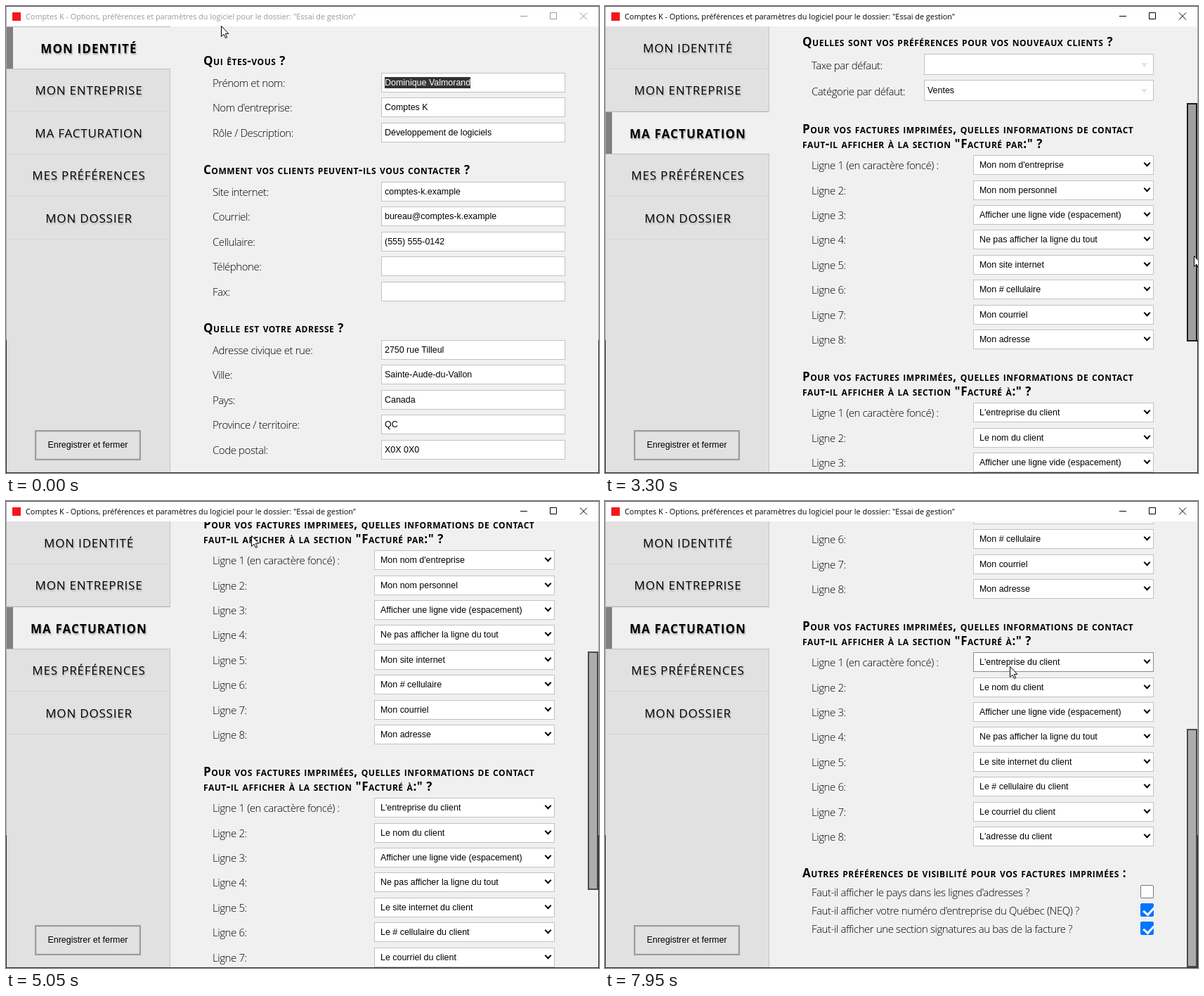
Animation of 844x664 px, one loop 8 s. Source, as an HTML page:

```html
<!DOCTYPE html>
<html lang="fr">
<head>
<meta charset="utf-8">
<style>
html, body { margin: 0; width: 100%; height: 100%; overflow: hidden; background: #f0f0f0; }
#stage { position: relative; width: 844px; height: 664px; overflow: hidden; background: #f0f0f0; color: #000; }
#stage * { position: absolute; box-sizing: border-box; white-space: pre; }
#bar { left: 0; top: 0; width: 844px; height: 29px; background: #fff; color: #000; }
#bar.idle { color: #999; }
#bar svg { left: 0; top: 0; fill: none; stroke: currentColor; }
.title { font: 10.85px/20px "Open Sans", sans-serif; }
.logo { background: #f5161f; }
#side { left: 0; top: 29px; width: 234px; height: 635px; background: #e1e1e1; border-right: 1px solid #c3c3c3; }
.nav { left: 0; width: 234px; height: 60px; border-bottom: 1px solid #d6d6d6; text-align: center;
  font: 17px/60px "Open Sans", sans-serif; letter-spacing: .8px; text-shadow: 1px 2px 2px #aaa; padding-left: 2px; }
.nav.on { background: #f0f0f0; font-weight: 700; letter-spacing: 1.1px; line-height: 62px;
  border-bottom-color: #bdbdbd; box-shadow: 0 -1px 0 #b5b5b5; }
.nav::before { content: ""; position: absolute; left: 0; top: 0; width: 10px; height: 59px; }
.nav.on::before { background: #808080; }
.nav.hover::before { background: #bababa; }
.button { border: 2px solid #9c9c9c; background: #e1e1e1; box-shadow: inset 0 0 0 1px #d0d0d0;
  text-align: center; font: 12.45px/38px Arial, "Liberation Sans", sans-serif; }
#view { left: 0; top: 0; width: 844px; height: 664px; clip-path: inset(30px 1px 1px 234px); }
.head { font: 700 17px/20px "Open Sans", sans-serif; font-variant-caps: small-caps; letter-spacing: .54px; }
.label { font: 300 15px/20px "Open Sans", sans-serif; letter-spacing: -.45px; word-spacing: .2px; }
.field { background: #fff; border: 1px solid #c2c2c2; padding-left: 4px; font: 12.45px/26px Arial, "Liberation Sans", sans-serif; }
.field.hover { border-color: #8a8a8a; }
.field span { position: static !important; background: #333; color: #fff; padding: 1px 0; }
.list { padding-left: 8px; }
.list::after { content: ""; position: absolute; right: 5.5px; top: 7px; width: 7px; height: 7px; box-sizing: border-box;
  border: solid #000; border-width: 0 2px 2px 0; transform: rotate(45deg); }
.combo { line-height: 28px; }
.combo::after { content: ""; position: absolute; right: 8px; top: 12px; width: 9px; height: 6px;
  background: #e4e4e4; clip-path: polygon(0 0, 100% 0, 50% 100%); }
.drop { background: #fff; border: 1px dashed #bcbcbc; }
.check { background: #fff; border: 1px solid #767676; border-radius: 2px; }
.check.on { background: #0075ff; border-color: #0075ff; }
.check.on::after { content: ""; position: absolute; left: 5.5px; top: 1px; width: 6.5px; height: 12px;
  border: solid #fff; border-width: 0 3px 3px 0; transform: rotate(42deg); }
#thumb { left: 828px; width: 15px; height: 339px; background: #adadad; border: 2px solid #4a4a4a; }
#thumb.hover { background: #a0a0a0; border-color: #1c1c1c; }
#frame { left: 0; top: 0; width: 844px; height: 664px; border: 1px solid #333;
  border-image: linear-gradient(#aaa 475px, #2a2a2a 475px) 1; }
#edge { left: 0; top: 0; width: 844px; height: 1px; background: #555; }
#cursor { left: 0; top: 0; overflow: visible; fill: #fff; stroke: #000; }
</style>
</head>
<body>
<div id="stage">
  <div id="view"></div>
  <div id="side"></div>
  <div id="bar"><svg width="844" height="29"><path d="M732 14.5h10M774.5 9.5h9v9h-9zM817 9.5l10 10M827 9.5l-10 10"/></svg></div>
  <div id="thumb"></div>
  <div id="frame"></div>
  <div id="edge"></div>
  <svg id="cursor" width="1" height="1">
    <path id="arrow" d="M.5 .5V15.5L4 12.2L6.5 17.5L8.7 16.5L6.3 11.3H10.8Z"/>
    <path id="hand" transform="translate(-6.5)" d="M5 12V2Q5 .5 6.5 .5T8 2V8Q8 6 9.5 6.3T11 8Q11 7 12.4 7.2T13.8 9Q14 8 15.2 8.3T16.3 10V15Q16 17 15 18.5V21.5H6.5V19Q4 16 1.2 13Q.2 11.5 1.5 10.7Q3 10.5 5 12.8Z"/>
  </svg>
</div>
<script>
const $ = id => document.getElementById(id);
const STEP = 35.4, NAV = 60.4, LOOP = 8000;
const selects = [];

function add(parent, cls, x, y, text = "", w, h) {
  const el = document.createElement("div");
  el.className = cls;
  el.textContent = text;
  el.style.left = x + "px";
  el.style.top = Math.round(y - (h || 20) / 2) + "px";
  if (w) { el.style.width = w + "px"; el.style.height = h + "px"; }
  parent.append(el);
  return el;
}
function page() {
  const el = document.createElement("div");
  el.style.cssText = "left:0;top:0";
  $("view").append(el);
  return el;
}
const head = (p, y, s) => add(p, "head", 281, y, s);
const label = (p, y, s) => add(p, "label", 294, y, s);
const check = (p, y, on) => add(p, on ? "check on" : "check", 762, y, "", 19, 19);
function select(p, cls, x, y, text, h) {
  selects.push({ el: add(p, "field " + cls, x, y, text, 781 - x, h), x, y, h });
}

// Title bar, navigation and button
add($("bar"), "logo", 9, 14.5, "", 12, 12);
add($("bar"), "title", 28, 15, 'Comptes K - Options, préférences et paramètres du logiciel pour le dossier: "Essai de gestion"');
const navs = ["MON IDENTITÉ", "MON ENTREPRISE", "MA FACTURATION", "MES PRÉFÉRENCES", "MON DOSSIER"]
  .map((s, i) => add($("side"), "nav", 0, 31 + NAV * i, s, 234, 60));
add($("side"), "button", 41, 595.5, "Enregistrer et fermer", 151, 43);

// Identity page
const identity = page();
function form(y, title, rows) {
  head(identity, y, title);
  rows.forEach(([name, value], i) => {
    const cy = y + 31 + STEP * i;
    label(identity, cy, name);
    add(identity, "field", 534, cy, value, 262, 28);
  });
}
form(78, "Qui êtes-vous ?", [
  ["Prénom et nom:", ""],
  ["Nom d'entreprise:", "Comptes K"],
  ["Rôle / Description:", "Développement de logiciels"]]);
form(233, "Comment vos clients peuvent-ils vous contacter ?", [
  ["Site internet:", "comptes-k.example"],
  ["Courriel:", "bureau@comptes-k.example"],
  ["Cellulaire:", "(555) 555-0142"],
  ["Téléphone:", ""],
  ["Fax:", ""]]);
form(458, "Quelle est votre adresse ?", [
  ["Adresse civique et rue:", "2750 rue Tilleul"],
  ["Ville:", "Sainte-Aude-du-Vallon"],
  ["Pays:", "Canada"],
  ["Province / territoire:", "QC"],
  ["Code postal:", "X0X 0X0"]]);
const marked = document.createElement("span");
marked.textContent = "Dominique Valmorand";
identity.querySelector(".field").append(marked);

// Billing page
const billing = page();
head(billing, 78, "Sélectionnez votre logo d'entreprise (Hauteur max. 80 pixels) :");
add(billing, "drop", 293, 141.5, "", 488, 95);
add(billing, "logo", 503, 143.5, "", 71, 71);
label(billing, 205, "Afficher ce logo sur mes factures clients:");
check(billing, 205, true);
head(billing, 253, "Quelles sont vos préférences pour vos nouveaux clients ?");
label(billing, 286, "Taxe par défaut:");
select(billing, "combo", 454, 285, "", 30);
label(billing, 323, "Catégorie par défaut:");
select(billing, "combo", 454, 322, "Ventes", 30);

function lines(y, side, values) {
  head(billing, y, "Pour vos factures imprimées, quelles informations de contact");
  head(billing, y + 20.5, `faut-il afficher à la section "Facturé ${side}:" ?`);
  values.forEach((value, i) => {
    const cy = y + 51.2 + STEP * i;
    label(billing, cy, `Ligne ${i + 1}${i ? ":" : " (en caractère foncé) :"}`);
    select(billing, "list", 524, cy, value, 28);
  });
}
const blank = "Afficher une ligne vide (espacement)", none = "Ne pas afficher la ligne du tout";
lines(377, "par", ["Mon nom d'entreprise", "Mon nom personnel", blank, none,
  "Mon site internet", "Mon # cellulaire", "Mon courriel", "Mon adresse"]);
lines(729, "à", ["L'entreprise du client", "Le nom du client", blank, none,
  "Le site internet du client", "Le # cellulaire du client", "Le courriel du client", "L'adresse du client"]);
head(billing, 1080, "Autres préférences de visibilité pour vos factures imprimées :");
["Faut-il afficher le pays dans les lignes d'adresses ?",
 "Faut-il afficher votre numéro d'entreprise du Québec (NEQ) ?",
 "Faut-il afficher une section signatures au bas de la facture ?"].forEach((s, i) => {
  label(billing, 1106.5 + 26 * i, s);
  check(billing, 1106 + 26 * i, i > 0);
});

// Keys are [time, value, ...]; the curve never overshoots a key
function curve(keys, t, k = 1) {
  const last = keys.length - 1;
  const slope = i => i < 0 || i >= last ? 0 : (keys[i + 1][k] - keys[i][k]) / (keys[i + 1][0] - keys[i][0]);
  const tangent = i => {
    const a = slope(i - 1), b = slope(i);
    return a * b > 0 ? 2 * a * b / (a + b) : 0;
  };
  if (t >= keys[last][0]) return keys[last][k];
  let i = 0;
  while (t >= keys[i + 1][0]) i++;
  const d = keys[i + 1][0] - keys[i][0], u = (t - keys[i][0]) / d, v = 1 - u;
  return keys[i][k] * v * v * (1 + 2 * u) + keys[i + 1][k] * u * u * (3 - 2 * u)
    + d * u * v * (tangent(i) * v - tangent(i + 1) * u);
}
const scrollKeys = [[0, 0], [2750, 0], [3300, 202], [3650, 293], [4000, 344], [6650, 344], [6700, 364],
  [6850, 444], [7150, 444], [7350, 551], [8000, 551]];
const pointer = [[0, 306, 28], [650, 96, 196], [850, 100, 190], [1750, 100, 190], [2550, 838, 247],
  [2750, 838, 247], [3300, 838, 355], [3650, 838, 404], [4000, 838, 431], [4300, 838, 431],
  [4800, 410, 16], [5050, 349, 49], [5150, 349, 49], [6000, 600, 256], [6350, 591, 344],
  [7150, 591, 344], [7950, 576, 235]];

function draw(t) {
  const x = Math.round(curve(pointer, t)), y = Math.round(curve(pointer, t, 2));
  const scroll = Math.round(curve(scrollKeys, t));
  const switched = t >= 1250;

  $("bar").className = t < 1150 ? "idle" : "";
  identity.style.display = switched ? "none" : "";
  billing.style.display = switched ? "" : "none";
  billing.style.top = -scroll + "px";

  const over = x < 234 && y >= 30 ? Math.floor((y - 30) / NAV) : -1;
  navs.forEach((el, i) => {
    el.classList.toggle("on", i === (switched ? 2 : 0));
    el.classList.toggle("hover", i === over);
  });

  // Hover follows scrolling a little late
  const cy = y + curve(scrollKeys, Math.max(0, t - 100));
  for (const s of selects)
    s.el.classList.toggle("hover", x >= s.x && x < 781 && Math.abs(cy - s.y) <= s.h / 2);

  const thumb = $("thumb");
  thumb.style.display = switched ? "" : "none";
  thumb.style.top = 30 + Math.round(scroll * 294 / 551) + "px";
  thumb.className = x >= 828 ? "hover" : "";

  $("cursor").style.transform = `translate(${x}px, ${y}px)`;
  $("hand").style.display = over >= 0 ? "" : "none";
  $("arrow").style.display = over >= 0 ? "none" : "";
}

const start = performance.now();
function tick() {
  draw((performance.now() - start) % LOOP);
  requestAnimationFrame(tick);
}
tick();
</script>
</body>
</html>
```
